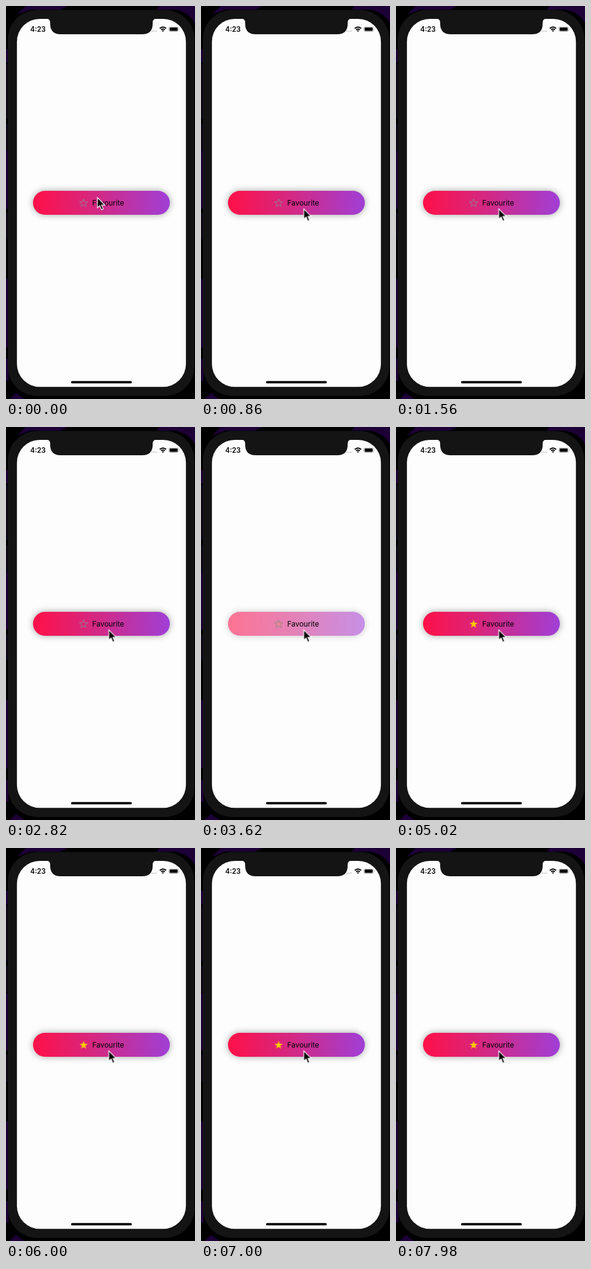
Recreate the animation shown at these times as an HTML page. Size 308x640 px, loop 8 s.

```html
<!DOCTYPE html>
<html lang="en">
<head>
<meta charset="utf-8">
<title>Favourite button</title>
<style>
  html, body { margin: 0; width: 100%; height: 100%; overflow: hidden; background: #000; }
  svg { display: block; width: 100vw; height: 100vh; }
  text { font-family: Inter, Roboto, sans-serif; fill: #000; }
  .button, .outline, .filled, .cursor { animation: 8s linear infinite; }
  .button { animation-name: press; }
  .outline { animation-name: empty; }
  .filled { opacity: 0; animation-name: fill; }
  .cursor { animation-name: move; }
  @keyframes press {
    0%, 42.5% { opacity: 1; }
    44%, 45.5% { opacity: .58; }
    50% { opacity: .8; }
    54.5% { opacity: .93; }
    58%, 100% { opacity: 1; }
  }
  @keyframes empty {
    0%, 45.25% { opacity: 1; }
    48%, 100% { opacity: 0; }
  }
  @keyframes fill {
    0%, 44.5% { opacity: 0; }
    45.25% { opacity: .1; }
    48%, 100% { opacity: 1; }
  }
  @keyframes move {
    0% { transform: translate(149px, 312px); animation-timing-function: ease-in-out; }
    10%, 100% { transform: translate(167.5px, 330.5px); }
  }
</style>
</head>
<body>
<svg viewBox="0 0 308 640" preserveAspectRatio="none">
  <defs>
    <linearGradient id="base">
      <stop offset="0" stop-color="#ff1048"/>
      <stop offset=".5" stop-color="#d02a88"/>
      <stop offset="1" stop-color="#a03fd6"/>
    </linearGradient>
    <filter id="blur" x="-20%" y="-100%" width="140%" height="300%">
      <feGaussianBlur stdDeviation="6"/>
    </filter>
    <path id="star" d="M0-7 1.7-2.2 6.7-2.1 2.7 1 4.1 5.8 0 2.9-4.1 5.8-2.7 1-6.7-2.1-1.7-2.2Z"/>
    <rect id="pill" x="44" y="301" width="223" height="39" rx="19.5"/>
  </defs>

  <!-- Backdrop -->
  <rect width="308" height="640"/>
  <g fill="#1c0036">
    <path d="M32 0H100L88 6H40L18 14ZM250 0H308V28Q298 10 276 6H246Z"/>
    <path d="M0 70H4V92H0ZM0 236H4V330H0ZM0 445H4V556H0ZM0 575H4V610H0ZM16 630 30 640H6Z"/>
  </g>
  <path fill="#0c0716" d="M0 95H4V184H0ZM0 192H4V235H0ZM0 337H4V380H0Z"/>

  <!-- Phone -->
  <rect x="3" y="6.5" width="304" height="628.5" rx="48" fill="#141414"/>
  <rect x="17.8" y="21" width="275.4" height="599.2" rx="37" fill="#fdfdfd"/>
  <path fill="#141414" d="M66 20.5Q72 21 72 27V29Q72 46 89 46H222Q239 46 239 29V27Q239 21 245 20.5Z"/>
  <rect x="106" y="610.8" width="99" height="3.8" rx="1.9"/>

  <!-- Status bar -->
  <text x="39.5" y="42" font-size="11.2" font-weight="600">4:23</text>
  <path d="M237 41H246" stroke="#bbb" stroke-width="1.5" stroke-dasharray="1.5 1"/>
  <path d="M250.6 36.5Q255.8 31.8 261 36.5M252.7 38.8Q255.8 36 258.9 38.8" fill="none" stroke="#000" stroke-width="1.9"/>
  <path d="M254 40.2Q255.8 38.8 257.6 40.2L255.8 42Z"/>
  <rect x="265.5" y="34" width="15.5" height="7.5" rx="2.2" fill="none" stroke="#a0a0a0" stroke-width=".8"/>
  <rect x="266.7" y="35.1" width="13" height="5.3" rx="1.2"/>
  <path d="M282.2 36.5Q283.6 37.7 282.2 39Z" fill="#a0a0a0"/>

  <!-- Button -->
  <g class="button">
    <use href="#pill" opacity=".36" filter="url(#blur)"/>
    <use href="#pill" fill="url(#base)"/>
  </g>
  <g transform="translate(126.5 321)">
    <use class="outline" href="#star" fill="none" stroke="#8e8790" stroke-width="1"/>
    <use class="filled" href="#star" fill="#ffcc00"/>
  </g>
  <text x="140.5" y="325.2" font-size="11.9">Favourite</text>

  <g class="cursor">
    <path d="M0 0V16.6L3.8 13.1 6.6 19.8 9.5 18.6 6.7 12.1H12Z" stroke="#fff" stroke-width="1.2"/>
  </g>
</svg>
</body>
</html>
```
